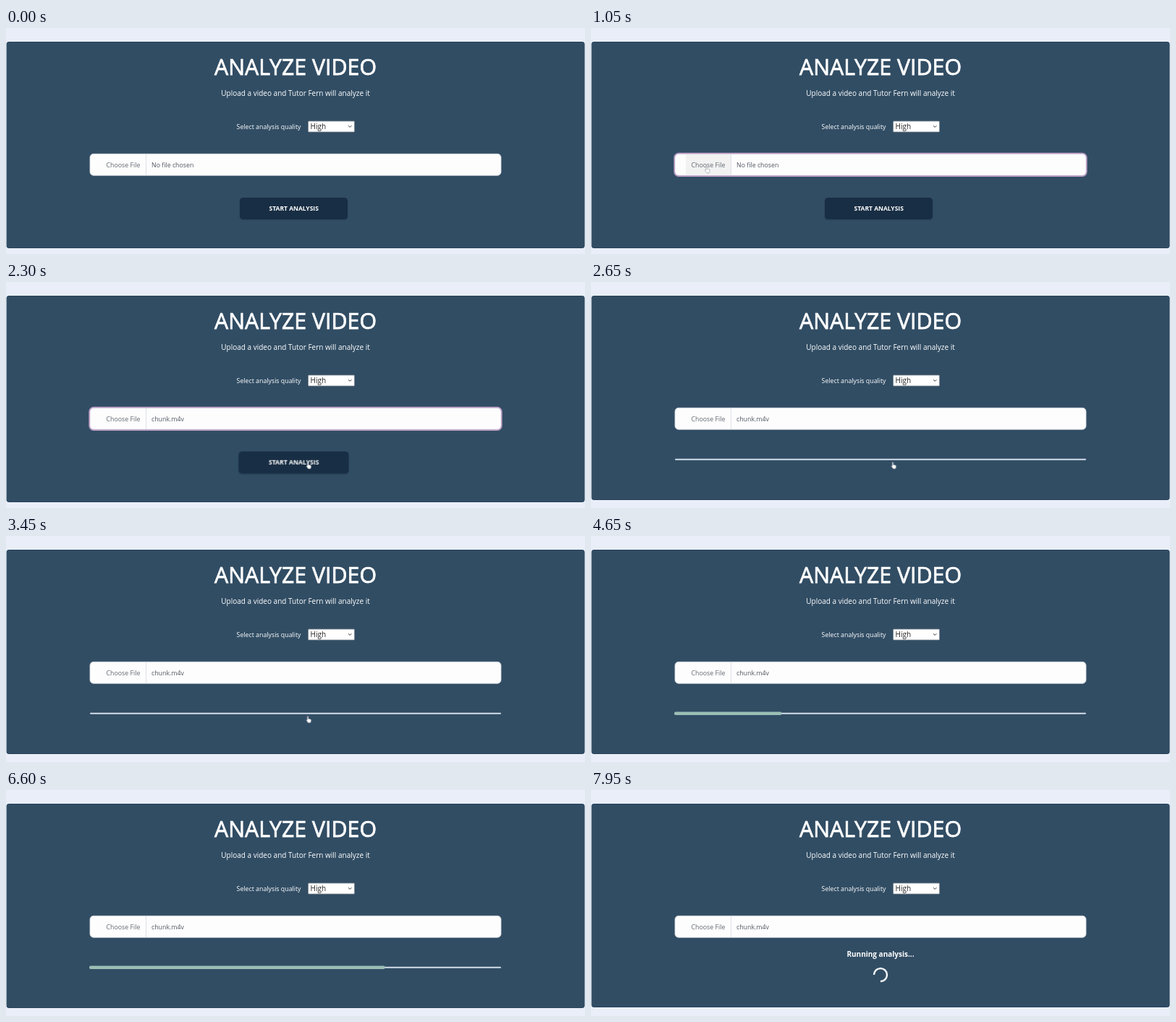
An HTML page that plays this animation: 800x313 px, repeating every 8000 ms.

```html
<!DOCTYPE html>
<html lang="en">
<head>
<meta charset="utf-8">
<title>Analyze video</title>
<style>
  html, body { margin: 0; width: 100%; height: 100%; overflow: hidden; background: #e9eef8; }
  svg { display: block; width: 100%; height: 100%; font-family: "Open Sans", sans-serif; }
  text { fill: #fff; }
  .mid { text-anchor: middle; }
  /* regular face with a thin outline gives a medium weight */
  .title { font-size: 30.3px; stroke: #fff; stroke-width: .75; }
  .body { font-size: 10px; }
  .small { font-size: 8.8px; }
  .bold { font-weight: 700; }
  .start { font-size: 8.5px; }
  .muted { fill: #62696f; }
  .file { fill: #51585f; }

  /* every part shares one 8 s timeline; .cut parts change without easing */
  .run { animation: 8s linear infinite; }
  .cut { animation: 8s step-end infinite; }

  .panel { animation-name: panel; }
  .empty { animation-name: empty; }
  .chosen { animation-name: chosen; }
  .hover { animation-name: hover; }
  .focus { animation-name: focus; }
  .button { animation-name: button; }
  .grow { animation-name: grow; transform-origin: 397.5px 250px; }
  .track { animation-name: track; }
  .bar { animation-name: bar; }
  .running { animation-name: running; }
  .spinner { animation-name: spin; transform-origin: 400px 256px; }
  .cursor { animation-name: move; }
  .seen { animation-name: seen; }
  .arrow { animation-name: arrow; }
  .hand { animation-name: hand; }

  @keyframes panel { 0% { height: 285px } 30% { height: 282px } 94.375%, 100% { height: 281px } }
  @keyframes empty { 0% { opacity: 1 } 17.5%, 100% { opacity: 0 } }
  @keyframes chosen { 0% { opacity: 0 } 17.5%, 100% { opacity: 1 } }
  @keyframes hover { 0% { opacity: 0 } 10% { opacity: 1 } 18.8%, 100% { opacity: 0 } }
  @keyframes focus { 0%, 11.25% { opacity: 0 } 13%, 30% { opacity: 1 } 32%, 100% { opacity: 0 } }
  @keyframes button { 0% { opacity: 1 } 30%, 100% { opacity: 0 } }
  @keyframes grow {
    0%, 22.2% { transform: scale(1) }
    24.4%, 30% { transform: scale(1.02) }
    30.01%, 100% { transform: scale(1) }
  }
  @keyframes track { 0% { opacity: 0 } 30% { opacity: 1 } 94.375%, 100% { opacity: 0 } }
  @keyframes bar {
    0%, 47.5% { width: 0 }
    55.625%, 57.5% { width: 138px }
    58.125%, 60.625% { width: 148.5px }
    66.875%, 69.375% { width: 246px }
    78.75%, 80% { width: 371px }
    82.5% { width: 408.5px }
    89.375%, 90.625% { width: 521px }
    93.125%, 100% { width: 569px }
  }
  @keyframes running { 0% { opacity: 0 } 94.375%, 100% { opacity: 1 } }
  @keyframes spin { 0%, 94.375% { transform: rotate(-12deg) } 100% { transform: rotate(204deg) } }
  @keyframes move {
    0%, 1.25% { transform: translate(-12px, 300px); animation-timing-function: ease-in-out }
    10.6%, 17.5% { transform: translate(158px, 191px); animation-timing-function: ease-in-out }
    24.4%, 100% { transform: translate(415.5px, 249px) }
  }
  @keyframes seen { 0% { opacity: 1 } 46%, 100% { opacity: 0 } }
  @keyframes arrow { 0% { opacity: 1 } 9.6% { opacity: 0 } 19.6% { opacity: 1 } 22.2%, 100% { opacity: 0 } }
  @keyframes hand { 0% { opacity: 0 } 9.6% { opacity: 1 } 19.6% { opacity: 0 } 22.2%, 100% { opacity: 1 } }
</style>
</head>
<body>
<svg viewBox="0 0 800 313" preserveAspectRatio="none">
  <rect class="panel cut" x="1.2" y="19.5" width="797.8" height="285" rx="2.5" fill="#314d64" stroke="#24425a"/>

  <text class="mid title" x="400" y="64.5">ANALYZE VIDEO</text>
  <text class="mid body" x="400" y="93.5">Upload a video and Tutor Fern will analyze it</text>

  <text class="small" x="318.6" y="140">Select analysis quality</text>
  <rect x="417.5" y="129" width="64" height="15" rx="1" fill="#fff" stroke="#77818b" stroke-width=".8"/>
  <text class="body" x="420.5" y="140.4" style="fill:#222">High</text>
  <path d="M473 135.2l2.2 2.2 2.2-2.2" fill="none" stroke="#333" stroke-width="1"/>

  <!-- file field -->
  <rect x="116" y="174.3" width="568" height="30" rx="5" fill="#fdfdfe" stroke="#ced6de" stroke-width=".8"/>
  <rect class="hover cut" x="131" y="174.8" width="62" height="29.2" fill="#f2f2f3"/>
  <path d="M193.5 174.8v29.2" stroke="#dde1e6"/>
  <rect class="focus run" x="115.2" y="173.5" width="569.6" height="31.6" rx="6" fill="none" stroke="#c4a0c9" stroke-width="1.6"/>
  <text class="small muted" x="138.5" y="192.5">Choose File</text>
  <text class="small file empty cut" x="201" y="192.5">No file chosen</text>
  <text class="small file chosen cut" x="201" y="192.5">chunk.m4v</text>

  <!-- start button -->
  <g class="button cut">
    <g class="grow run">
      <rect x="322.5" y="236" width="150" height="30.5" rx="5" fill="#182e44" opacity=".25"/>
      <rect x="323" y="235" width="149" height="30" rx="4.5" fill="#182e44"/>
      <text class="mid bold start" x="397.7" y="253">START ANALYSIS</text>
    </g>
  </g>

  <!-- progress -->
  <g class="track cut">
    <rect x="116" y="244.7" width="568" height="2.1" rx="1" fill="#d3deea"/>
    <rect class="bar run" x="115" y="243.4" width="0" height="4.6" rx="2" fill="#9bbfb4"/>
  </g>

  <g class="running cut">
    <text class="mid bold body" x="400" y="231.3">Running analysis...</text>
    <circle class="spinner run" cx="400" cy="256" r="9" fill="none" stroke="#f4f7fa" stroke-width="2.4" pathLength="100" stroke-dasharray="75 25"/>
  </g>

  <g class="seen cut">
    <g class="cursor run" fill="#fff" stroke="#737d86" stroke-width=".5" stroke-linejoin="round">
      <path class="arrow cut" d="M0 0v9.4l2.2-2 1.5 3.4 1.5-.7-1.5-3.2h3z"/>
      <path class="hand cut" d="M.8 1.1Q.8.2 1.5.2t.7.9v3q.9-.4 1.3.3.9-.3 1.2.4 1.3-.2 1.3 1v1.9L5.1 9.8H2L-.3 6.4q-.4-.9.4-1l.7.6z"/>
    </g>
  </g>
</svg>
</body>
</html>
```
